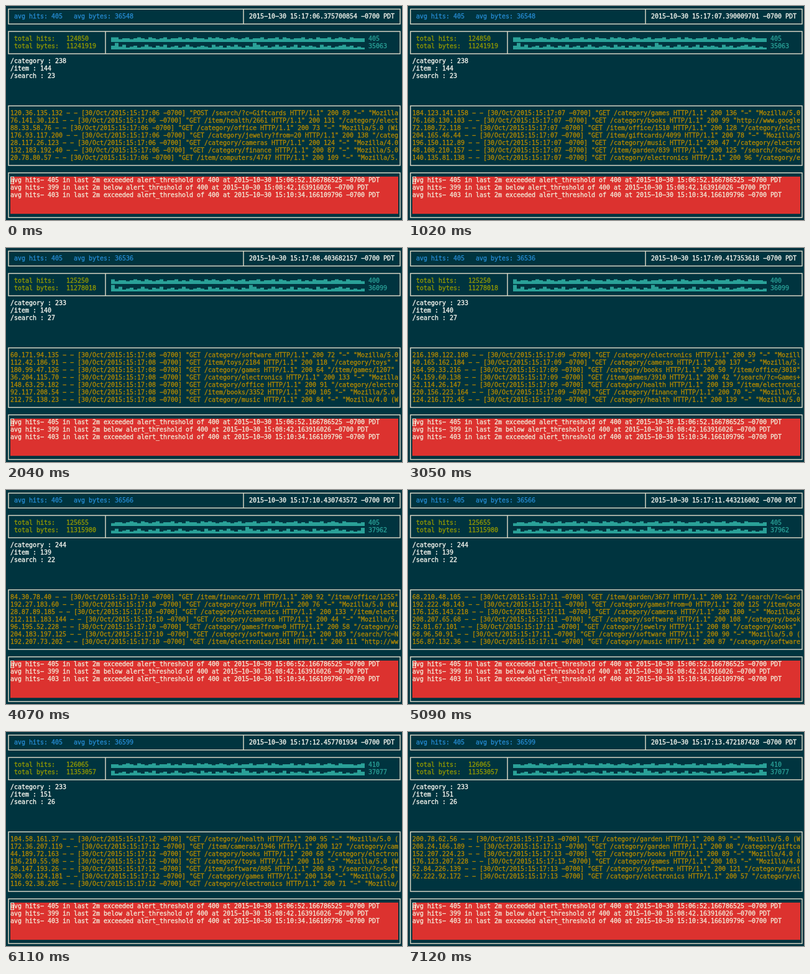
These frames come from a looping animation (637 px wide and 345 px high, 8 s). An HTML page with a canvas:

```html
<!DOCTYPE html>
<html lang="en">
<head>
<meta charset="utf-8">
<title>Log monitor</title>
<style>
html, body { margin: 0; width: 100%; height: 100%; overflow: hidden; background: #00343f; }
canvas { display: block; }
</style>
</head>
<body>
<canvas id="stage" width="637" height="345"></canvas>
<script>
const ctx = document.getElementById('stage').getContext('2d');
const LOOP = 8000;
const CELL_W = 6, CELL_H = 12, COLS = 104;
const BARS = 68;
const color = {
  back: '#00343f', line: '#e4dfcc', white: '#fefcf4', pale: '#f3ecd9',
  blue: '#268bd2', green: '#949a00', amber: '#b58900', cyan: '#2aa198', red: '#dc322f'
};

// Each tick: start in ms, clock seconds, requests as "ip path bytes referer [version] [method]".
const ticks = [
  { at: 0, clock: '06.375700854', log: `
120.36.135.132 /search/?c=Giftcards 89 - 5.0 POST
76.141.30.121 /item/health/2661 131 /category/electronics
88.33.58.76 /category/office 73 -
176.93.117.200 /category/jewelry?from=20 138 /category/jewelry
28.117.26.123 /category/cameras 124 - 4.0
132.183.192.40 /category/finance 87 -
20.78.80.57 /item/computers/4747 109 -` },
  { at: 1020, clock: '07.390009701', log: `
184.123.141.158 /category/games 136 -
76.168.130.103 /category/books 99 http://www.google.com
72.180.72.118 /item/office/1510 128 /category/electronics
204.165.46.44 /item/giftcards/4099 78 -
196.150.112.89 /category/music 47 /category/electronics
48.108.210.157 /item/garden/839 125 /search/?c=Garden
140.135.81.138 /category/electronics 96 /category/electronics` },
  { at: 2040, clock: '08.403682157', log: `
60.171.94.135 /category/software 72 -
112.42.186.91 /item/toys/2184 118 /category/toys
180.99.47.126 /category/games 64 /item/games/1207
36.204.115.70 /category/electronics 133 -
148.63.29.182 /category/office 91 /category/electronics
92.117.208.54 /item/books/3352 105 -
212.75.138.23 /category/music 84 - 4.0` },
  { at: 3050, clock: '09.417353618', log: `
216.198.122.108 /category/electronics 59 -
40.165.162.184 /category/cameras 137 -
164.99.33.216 /category/books 50 /item/office/3018
24.159.60.138 /item/games/3910 42 /search/?c=Games+Electronics
32.114.26.147 /category/health 139 /item/electronics/1032
220.156.223.164 /category/finance 70 -
124.216.172.45 /category/health 139 -` },
  { at: 4070, clock: '10.430743572', log: `
84.30.78.40 /item/finance/771 92 /item/office/1255
192.27.183.60 /category/toys 76 -
28.87.89.185 /category/electronics 133 /item/electronics/2210
212.111.183.144 /category/cameras 44 -
96.195.52.228 /category/games?from=0 58 /category/office
204.183.197.125 /category/software 103 /search/?c=Networking
192.207.73.202 /item/electronics/1581 111 http://www.google.com` },
  { at: 5090, clock: '11.443216002', log: `
68.210.48.105 /item/garden/3677 122 /search/?c=Garden
192.222.48.143 /category/games?from=0 125 /item/books/1480
176.126.143.218 /category/cameras 100 -
208.207.65.68 /category/software 108 /category/books
52.81.67.101 /category/jewelry 80 /category/books
68.96.50.91 /category/software 90 -
156.87.132.36 /category/music 87 /category/software` },
  { at: 6110, clock: '12.457701934', log: `
104.58.161.37 /category/health 95 -
172.36.207.119 /item/cameras/1946 127 /category/cameras
44.189.72.163 /category/books 68 /category/electronics
136.210.55.98 /category/toys 116 -
80.147.193.26 /item/software/805 83 /search/?c=Software
200.69.124.181 /category/games 134 -
116.92.38.205 /category/electronics 71 -` },
  { at: 7120, clock: '13.472187428', log: `
200.78.62.56 /category/garden 89 -
208.24.166.189 /category/garden 88 /category/giftcards
152.207.224.23 /category/books 89 - 4.0
176.123.207.228 /category/games 103 - 4.0
52.84.226.139 /category/software 121 /category/music
92.222.92.172 /category/electronics 57 /category/electronics` }
];

// Totals refresh on every second tick.
const totals = [
  { hits: 405, bytes: 35063, sumHits: 124850, sumBytes: 11241919, avg: 36548, pages: [238, 144, 23] },
  { hits: 400, bytes: 36099, sumHits: 125250, sumBytes: 11278018, avg: 36536, pages: [233, 140, 27] },
  { hits: 405, bytes: 37962, sumHits: 125655, sumBytes: 11315980, avg: 36566, pages: [244, 139, 22] },
  { hits: 410, bytes: 37077, sumHits: 126065, sumBytes: 11353057, avg: 36599, pages: [233, 151, 26] }
];

// Bar heights in eighths of a row; the window moves one bar per refresh.
const hitBars = '55344345435434534453435443545434543453445344535434453435445345435444345';
const byteBars = '47352342353243523423532343253424353243753423534235243432534234534232364';

const alerts = [
  '405 in last 2m exceeded alert_threshold of 400 at 2015-10-30 15:06:52.166786525',
  '399 in last 2m below alert_threshold of 400 at 2015-10-30 15:08:42.163916026',
  '403 in last 2m exceeded alert_threshold of 400 at 2015-10-30 15:10:34.166109796'
];

const px = col => col * CELL_W + 1;
const py = row => row * CELL_H - 1;

// A hairline stroke gives the glyphs their slightly heavy weight; hyphens are drawn wide.
function text(col, row, str, fill) {
  ctx.fillStyle = ctx.strokeStyle = fill;
  ctx.lineWidth = 0.3;
  [...str.replaceAll('-', '\u2212')].forEach((ch, i) => {
    if (ch === ' ') return;
    ctx.fillText(ch, px(col + i), py(row) + 9);
    ctx.strokeText(ch, px(col + i), py(row) + 9);
  });
}

// Frame lines run through the cell centres.
function box(top, bottom, divider) {
  const y = py(top) + 6, h = (bottom - top) * CELL_H;
  ctx.strokeStyle = color.line;
  ctx.lineWidth = 1.4;
  ctx.strokeRect(px(0) + 3, y, (COLS + 1) * CELL_W, h);
  if (divider) {
    ctx.beginPath();
    ctx.moveTo(px(divider) + 3, y);
    ctx.lineTo(px(divider) + 3, y + h);
    ctx.stroke();
  }
}

function sparkline(row, levels, shift) {
  ctx.fillStyle = color.cyan;
  for (let i = 0; i < BARS; i++) {
    const h = levels[i + shift] * CELL_H / 8;
    ctx.fillRect(px(28 + i), py(row + 1) - 1 - h, CELL_W, h);
  }
}

function logLine(entry, clock) {
  const [ip, path, size, referer, version = '5.0', method = 'GET'] = entry.split(' ');
  const stamp = `30/Oct/2015:15:17:${clock.slice(0, 2)} -0700`;
  const line = `${ip} - - [${stamp}] "${method} ${path} HTTP/1.1" 200 ${size} ` +
    `"${referer}" "Mozilla/${version} (Windows NT 6.1)`;
  return line.slice(0, COLS);
}

function drawAlerts() {
  ctx.fillStyle = color.red;
  ctx.fillRect(px(1), py(23), COLS * CELL_W, 5 * CELL_H);
  alerts.forEach((msg, i) => text(1, 23 + i, `avg hits- ${msg} -0700 PDT`, color.pale));
  ctx.strokeStyle = color.pale;
  ctx.lineWidth = 1;
  ctx.strokeRect(px(1) + 0.5, py(23) + 0.5, CELL_W - 1, CELL_H - 1);
}

function draw(index) {
  const tick = ticks[index];
  const step = index >> 1;
  const sum = totals[step];
  ctx.fillStyle = color.back;
  ctx.fillRect(0, 0, 637, 345);
  ctx.font = '10px "DejaVu Sans Mono", monospace';

  box(0, 2, 63);
  text(2, 1, `avg hits: 405   avg bytes: ${sum.avg}`, color.blue);
  text(65, 1, `2015-10-30 15:17:${tick.clock} -0700 PDT`, color.white);

  box(3, 6, 26);
  text(2, 4, `total hits:   ${sum.sumHits}`, color.green);
  text(2, 5, `total bytes:  ${sum.sumBytes}`, color.green);
  sparkline(4, hitBars, step);
  sparkline(5, byteBars, step);
  text(97, 4, `${sum.hits}`, color.cyan);
  text(97, 5, `${sum.bytes}`, color.cyan);

  ['category', 'item', 'search'].forEach((name, i) =>
    text(1, 7 + i, `/${name} : ${sum.pages[i]}`, color.white));

  box(13, 21);
  tick.log.trim().split('\n').forEach((entry, i) =>
    text(1, 14 + i, logLine(entry, tick.clock), color.amber));

  box(22, 28);
  drawAlerts();
}

let shown = -1;
function frame() {
  const t = performance.now() % LOOP;
  const index = ticks.filter(tick => tick.at <= t).length - 1;
  if (index !== shown) draw(shown = index);
  requestAnimationFrame(frame);
}
frame();
</script>
</body>
</html>
```
